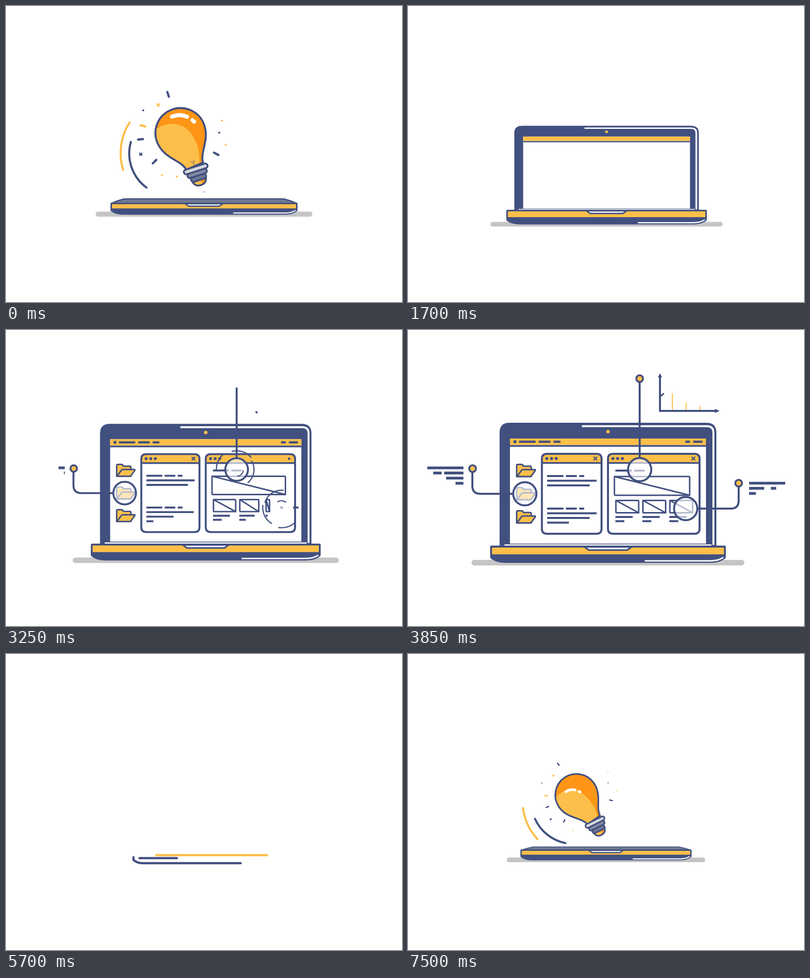
Animation of 800x600 px, one loop 7550 ms. Source, as an HTML page with a canvas:

```html
<!DOCTYPE html>
<html lang="en">
<head>
<meta charset="utf-8">
<title>Idea to laptop</title>
<style>
html, body { margin: 0; width: 100%; height: 100%; overflow: hidden; background: #fff; }
canvas { display: block; width: 800px; height: 600px; }
</style>
</head>
<body>
<canvas id="stage" width="800" height="600"></canvas>
<script>
const c = document.getElementById('stage').getContext('2d');
const LOOP = 7550;
const NAVY = '#425080', YELLOW = '#fdbf4a', ORANGE = '#fe9516', SHADOW = '#c5c5c5', WHITE = '#fff';
const TAU = Math.PI * 2, RAD = Math.PI / 180;

const clamp = v => Math.max(0, Math.min(1, v));
const mix = (a, b, p) => a + (b - a) * p;
const prog = (t, start, dur) => clamp((t - start) / dur);
const out = p => 1 - (1 - p) * (1 - p);
const ease = (t, start, dur) => out(prog(t, start, dur));

function group(draw) { c.save(); draw(); c.restore(); }

function paint(fill, stroke, w = 4, path = null) {
  if (fill) { c.fillStyle = fill; path ? c.fill(path) : c.fill(); }
  if (stroke) { c.strokeStyle = stroke; c.lineWidth = w; path ? c.stroke(path) : c.stroke(); }
}

function shape(d, fill, stroke, w) { paint(fill, stroke, w, new Path2D(d)); }

function rect(x, y, w, h, r, fill, stroke, lw) {
  c.beginPath();
  c.roundRect(x, y, w, h, r);
  paint(fill, stroke, lw);
}

function arc(x, y, r, from, to, color, w) {
  c.beginPath();
  c.arc(x, y, r, from * RAD, to * RAD);
  paint(null, color, w);
}

function disc(x, y, r, fill, stroke, lw) {
  if (r <= 0) return;
  c.beginPath();
  c.arc(x, y, r, 0, TAU);
  paint(fill, stroke, lw);
}

function line(x1, y1, x2, y2, color = NAVY, w = 4, cap = 'round') {
  c.beginPath();
  c.moveTo(x1, y1);
  c.lineTo(x2, y2);
  c.lineCap = cap;
  paint(null, color, w);
}

function trim(d, len, p, w = 4) {
  if (p <= 0) return;
  group(() => {
    c.lineCap = 'butt';
    if (p < 1) c.setLineDash([len * p, len * 2]);
    shape(d, null, NAVY, w);
  });
}

// Word bars laid out from x in direction dir, each growing a little after the last.
function words(x, y, widths, p, { dir = 1, gap = 5, w = 4, cap = 'butt' } = {}) {
  widths.forEach((width, i) => {
    const q = clamp(p * 1.3 - i * .15);
    if (q > 0) line(x, y, x + dir * width * q, y, NAVY, w, cap);
    x += dir * (width + gap);
  });
}

/* ---- bulb ---- */
const BULB = 'M-20 79C-22 55 -55 38 -55 0A55 55 0 0 1 55 0C55 38 22 55 20 79Z';
const FILAMENT = 'M-5 79L-11.5 8Q-13 -6 -20 -6A8 8 0 1 0 -20 10H20A8 8 0 1 0 20 -6Q13 -6 11.5 8L5 79';
const TIP = 'M-16 108Q-14 123 0 123Q14 123 16 108Z';

function glass(t) {
  const peek = prog(t, -50, 50), settle = ease(t, 0, 300);
  const light = .4 * peek + .6 * settle, wire = .03 + .11 * peek + .86 * settle;
  const m = (a, b) => mix(a, b, light);
  shape(BULB, ORANGE);
  group(() => {
    c.clip(new Path2D(BULB));
    const y = m(-24, -36);
    shape(`M${m(-54, -37)} ${y}C${m(-16, 5)} ${m(-36, -38)} ${m(24, 28)} ${m(-18, -10)} ` +
      `${m(20, 28)} ${m(45, 20)}Q24 50 11 80H-60V${y}Z`, YELLOW);
  });
  group(() => {
    c.translate(0, 79 * (1 - wire));
    c.scale(wire, wire);
    shape(FILAMENT, null, NAVY, Math.min(4, 2 / wire));
  });
  shape(BULB, null, NAVY, 4.2);
  group(() => {
    const size = mix(.75, 1, peek);
    c.translate(-16 * (1 - peek), 8 * (1 - peek));
    c.rotate(-14 * RAD * (1 - settle));
    c.scale(size, size);
    shape('M7 -40Q24 -36 33 -20', null, WHITE, 9);
    shape('M38 -7L39 -2', null, WHITE, 8.5);
  });
}

function bulb(t) {
  const away = prog(t, 1270, 180);
  const grow = ease(t, -187, 261), s = grow * (1 - away * away);
  if (s < .1) return;
  // Damped swing while the bulb comes to rest.
  const rot = -18 * Math.exp(-t / 250) * Math.cos(t / 150 + .7) / Math.cos(.7);
  group(() => {
    c.beginPath();
    c.rect(0, 0, 800, 390);
    c.clip();
    c.translate(400 + rot * .33, 362 + 25 * (1 - grow) + 36 * away);
    c.rotate(rot * RAD);
    c.scale(s, s);
    c.translate(0, -124);
    c.lineCap = c.lineJoin = 'round';
    group(() => {
      c.translate(0, 82);
      c.rotate(rot * .3 * RAD);
      c.translate(0, -82);
      glass(t);
    });
    shape(TIP, YELLOW);
    shape('M1 108H16Q14 123 2 123Q6 115 1 108Z', ORANGE);
    shape(TIP, null, NAVY, 4);
    ['#6e7994', '#808ba3', '#d6dadc'].forEach((color, i) =>
      rect(-17 - 5 * i, 101 - 10.3 * i, 34 + 10 * i, 10.3, 5, color, NAVY));
  });
}

function bulbShadow(t) {
  const rx = 36 * ease(t, -15, 300) * (1 - prog(t, 1200, 220));
  if (rx <= 0) return;
  c.beginPath();
  c.ellipse(400, 377, rx, .6 + rx * .103, 0, 0, TAU);
  paint(SHADOW);
}

/* ---- burst around the rising bulb ---- */
// d dot, l dash, s star; capitals are yellow. Nine on the left, the rest on the right.
const BITS = 'DDlslLdSlDdDl';

function star(x, y, r, color) {
  const k = r * .3;
  shape(`M${x - r} ${y - r}Q${x} ${y - k} ${x + r} ${y - r}Q${x + k} ${y} ${x + r} ${y + r}` +
    `Q${x} ${y + k} ${x - r} ${y + r}Q${x - k} ${y} ${x - r} ${y - r}`, color);
}

function burst(t) {
  const far = t < 0 ? 1 + t / 50 : 1 + 1.2 * ease(t, 0, 250);
  const size = clamp(.55 + .45 * far) * (1 - prog(t, 150, 300));
  if (size < .03) return;
  [...BITS].forEach((kind, i) => {
    const angle = ((i < 9 ? 96 + 19.5 * i : -20 + 16 * (i - 9)) + 17 * (far - 1)) * RAD;
    const r = 70 + 14 * far + 8 * Math.sin(i * 2.4);
    const ux = Math.cos(angle), uy = Math.sin(angle);
    const x = 345 + 9 * far + ux * r, y = 284 - 22 * far + uy * r;
    const color = kind < 'a' ? YELLOW : NAVY, half = 5 * size;
    if (/s/i.test(kind)) star(x, y, 4 * size, color);
    else if (/l/i.test(kind)) line(x - ux * half, y - uy * half, x + ux * half, y + uy * half, color, 4.5 * size);
    else disc(x, y, 2 * size, color);
  });
}

function swoosh(t) {
  const orbit = (x, y, r, tail, head, color) => {
    const from = Math.max(100, tail + .5 * t), to = head + .8 * Math.min(t, 60);
    c.lineCap = 'round';
    if (to > from) arc(x, y, r, from, to, color, 4.2);
  };
  orbit(346, 298, 114.5, 162, 212, YELLOW);
  orbit(335, 299, 86, 126, 195, NAVY);
}

/* ---- laptop body ---- */
function view(z) {
  c.translate(385, 275);
  c.scale(z, z);
  c.translate(-385, -275);
}

function pose(t, z) {
  const s = t < 5420
    ? 1 - .066 * (1 - ease(t, 0, 150))
    : mix(mix(1, .69, prog(t, 5420, 140)), .854, ease(t, 5560, 1690)) + .08 * prog(t, 7500, 50);
  const drop = 15 * prog(t, 5420, 140) * (1 - prog(t, 5700, 1400));
  const k = ease(t, 1350, 200) * (1 - prog(t, 5420, 80));
  const rest = 402.5 - 34.2 * (1 - s);
  return {
    k,
    x: mix(400, 385 + 19 * z, k),
    y: mix(rest + drop, 275 + 164 * z, k),
    s: mix(s, 1.178 * z, k),
    lid: (rest - 391) / (11.5 * s)
  };
}

function place(p) {
  c.translate(p.x, p.y);
  c.scale(p.s, p.s);
}

function body(p, t, lid) {
  const bh = mix(12.2, 15, p.k), end = bh + mix(11.6, 12.6, p.k);
  const reveal = t > 5560 ? 210 * ease(t, 6000, 320) : 210;
  place(p);
  const bar = t < 7000 ? 1 - prog(t, 5350, 150) : ease(t, 7260, 180);
  if (bar > 0) rect(-234 * bar, mix(17.5, 23, p.k), 468 * bar, mix(11, 9.4, p.k), 5, SHADOW);
  if (reveal <= 0) return;
  c.beginPath();
  c.rect(-reveal, -30, reveal * 2, 70);
  c.clip();
  c.lineJoin = c.lineCap = 'round';
  if (lid > 0) group(() => {
    c.scale(1, lid * p.lid);
    shape('M-200.5 0Q-188 -7 -172 -11.5H172Q188 -7 200.5 0Z', '#6e7993', NAVY, 3);
  });
  shape(`M-202 ${bh - 1}V${end - 8}Q-194 ${end} -177 ${end + .5}H177Q194 ${end} 202 ${end - 8}V${bh - 1}Z`, NAVY);
  rect(-200.5, 0, 401, bh, 1, YELLOW, NAVY, 3.2);
  shape('M-40.5 .5L-33 6H33L40.5 .5Z', '#f4f5f9', NAVY, 2.8);
  shape(`M64 ${end - 3}H176Q190 ${end - 3.5} 197 ${end - 8.5}`, null, WHITE, 2.4);
}

// Outline strokes that build the closed body.
function sketch(p, t) {
  if (t < 5560 || t > 6330) return;
  const grow = ease(t, 5540, 300), mid = 100 * (1 - grow);
  group(() => {
    place(p);
    c.lineCap = 'round';
    const w = 4.5 / p.s;
    line(mid - 199 * grow, 0, mid + 199 * grow, 0, YELLOW, w);
    line(-182, 8.5, mix(-182, 199, prog(t, 5640, 220)), 8.5, NAVY, w);
    shape(`M-199 6V13Q-192 21 -177 22.5H${mix(-177, 180, grow)}`, null, NAVY, w);
  });
}

/* ---- screen ---- */
function folder(y, p) {
  if (p <= 0) return;
  group(() => {
    c.translate(0, y);
    c.lineJoin = 'round';
    group(() => {
      c.scale(1, clamp(p * 2));
      shape('M219.5 0V-22Q219.5 -24.5 222 -24.5H230Q232 -24.5 233 -21H247Q249 -21 249 -18V0Z', YELLOW, NAVY, 3);
    });
    c.scale(1, Math.max(.15, p * 2 - 1));
    shape('M220 0L229 -12Q230 -14 232 -14H256Q258 -14 257 -12L249 -1Q248 0 246 0Z', YELLOW, NAVY, 3);
  });
}

function pane(x, w, u, start, crossAt) {
  const dur = 360, r = x + w;
  const d = `M${x} 269V261Q${x} 251 ${x + 10} 251H${r - 10}Q${r} 251 ${r} 261V403Q${r} 413 ${r - 10} 413` +
    `H${x + 10}Q${x} 413 ${x} 403Z`;
  const head = ease(u, start + dur, 170);
  if (head > 0) group(() => {
    c.clip(new Path2D(d));
    c.fillStyle = YELLOW;
    c.fillRect(x, 251, w * head, 17);
    line(x, 269.5, x + w * head, 269.5, NAVY, 3.6, 'butt');
    for (let i = 0; i < 3; i++) disc(x + 10 + i * 9.5, 260.5, 3.1 * head, NAVY);
  });
  trim(d, w * 2 + 316, prog(u, start, dur));
  const k = 3 * prog(u, crossAt, 150), cx = r - 12.5;
  if (k > 0) for (const side of [-k, k]) line(cx - side, 260.5 - k, cx + side, 260.5 + k, NAVY, 2.4);
}

// A heading of three words over lines that get shorter.
function paragraph(y, rows, u, start) {
  for (let j = 0; j < rows; j++) {
    const widths = j ? [100 - 14 * (j - 1) ** 2] : [33, 22, 10];
    words(281, y + 9.5 * j, widths, prog(u, start + 70 * j, 280));
  }
}

function frame(x, y, w, h, p) {
  if (p <= 0) return;
  rect(x, y, w * p, h, 2, WHITE, NAVY, 3);
  line(x, y, x + w * p, y + h, NAVY, 3);
}

function screen(u) {
  rect(206, 220, 396, 213, 0, WHITE);
  rect(206, 220, 396, 13, 0, YELLOW);
  line(206, 235, 602, 235, NAVY, 3.6, 'butt');
  const menu = { gap: 10, w: 4.6, cap: 'round' };
  disc(216, 226.5, 3.2 * prog(u, 2300, 130), NAVY);
  words(226, 226.5, [30, 20, 10], prog(u, 2300, 260), menu);
  words(562, 226.5, [6, 15], prog(u, 2500, 260), menu);
  for (let i = 0; i < 3; i++) folder(297 + 47 * i, prog(u, 2050 + i * 140, 250));
  pane(270.5, 120.5, u, 2270, 2800);
  pane(404, 185, u, 2330, 3190);
  paragraph(296, 3, u, 2750);
  paragraph(362, 4, u, 2970);
  words(419, 285, [33, 21], prog(u, 2900, 280));
  frame(417, 297, 152, 38, ease(u, 2850, 260));
  for (let i = 0; i < 3; i++) {
    const x = 420 + 54.5 * i, at = 2950 + i * 140;
    frame(x, 345.5, 46, 25, ease(u, at, 260));
    words(x - 1, 379, [35], prog(u, at, 230));
    words(x - 1, 387.5, [18], prog(u, at + 30, 230));
  }
}

function lid(h, u) {
  c.translate(0, 439);
  c.scale(1, h);
  c.translate(0, -439);
  shape('M185 440V208Q185 188 205 188H603Q623 188 623 208V440Z', NAVY);
  c.lineCap = 'round';
  shape('M353 195H604Q617 195 617 208V434', null, WHITE, 4);
  line(196, 436, 612, 436, WHITE, 3);
  disc(404, 206, 3.6, YELLOW);
  screen(u);
}

/* ---- callouts ---- */
function lens(x, y, u, start, rings) {
  const p = (u - start) / 420, r = 23.5;
  if (p <= 0) return;
  const q = clamp((p - .4) / .5);
  if (q >= 1) disc(x, y, r, 'rgba(255,255,255,.62)');
  trim(`M${x} ${y - r}A${r} ${r} 0 0 0 ${x} ${y + r}A${r} ${r} 0 0 0 ${x} ${y - r}`, TAU * r, q);
  const grow = Math.min(clamp(p / .25), clamp((1.3 - p) / .3));
  if (!rings || grow <= 0) return;
  const spin = (p - .95) * 200;
  c.lineCap = 'round';
  for (let i = 0; i < 3; i++) {
    const from = 180 + 75 * i + spin;
    arc(x, y, 42 - 3 * i, from, from + (50 + 14 * i) * grow, NAVY, 2.5);
  }
  arc(x, y, 14, 10 + spin, 10 + spin + 70 * grow, NAVY, 2.4);
  if (p < .5) disc(x, y, 2, WHITE, NAVY, 1);
}

function callout(d, len, x, y, u, start, dur) {
  trim(d, len, prog(u, start, dur));
  disc(x, y, 6.8 * ease(u, start + dur, 100), YELLOW, NAVY, 3.8);
}

function caption(x, y, dir, u, start, step) {
  for (let j = 0; j < 4; j++) {
    const widths = j === 1 ? [39, 17] : [73 - 19 * j];
    words(x, y + 10.4 * j, widths, prog(u, start + step * j, 300), { dir, w: 5.6 });
  }
}

function chart(u) {
  const p = ease(u, 3250, 420);
  if (p <= 0) return;
  [45, 30, 37, 50].forEach((h, i) => {
    const q = prog(u, 3600 + 90 * i, 340);
    if (q > 0) rect(533 + 28 * i, 162 - h * q, 2 + 9 * clamp(q * 4 - 3), h * q, 0, YELLOW);
  });
  trim('M511 134L538 108L570 124L596 112L621 100', 125, prog(u, 3830, 320), 3.2);
  line(509, 164, 509, 164 - 72 * p);
  line(509, 164, 509 + 116 * p, 164);
  const tip = prog(u, 3620, 100);
  if (tip > 0) {
    shape(`M${509 - 2.5 * tip} 95L509 ${95 - 5 * tip}L${509 + 2.5 * tip} 95Z`, NAVY, NAVY, 2);
    shape(`M621 ${164 - 2.5 * tip}L${621 + 6 * tip} 164L621 ${164 + 2.5 * tip}Z`, NAVY, NAVY, 2);
  }
}

function callouts(u) {
  lens(236, 332, u, 2160, false);
  lens(468, 283, u, 2850, true);
  lens(561, 362, u, 3130, true);
  callout('M212 332H146Q130 332 130 316V288', 120, 130.5, 281, u, 2550, 300);
  callout('M468 259V105', 154, 468, 98.5, u, 2880, 390);
  callout('M585 362H652Q668 362 668 346V317', 121, 668, 310.5, u, 3220, 330);
  caption(112, 279.5, -1, u, 3210, 30);
  caption(689, 310.5, 1, u, 3580, 90);
  chart(u);
}

function draw(t) {
  c.clearRect(0, 0, 800, 600);
  const bt = t > 7000 ? t - LOOP : t;
  // The outro plays the screen content backwards, faster.
  const u = t < 4800 ? t : 4300 - (t - 4800) * 4.2;
  const z = .851 + .149 * ease(t, 2380, 1470) * (1 - ease(t, 5000, 400));
  const open = ease(t, 1450, 450) * (1 - ease(t, 5200, 250));
  const p = pose(t, z);
  const upright = open > .08;
  const flat = upright ? 0 : t > 5560 ? ease(t, 6500, 250) : 1;

  if (upright) group(() => { view(z); lid(open, u); });
  group(() => body(p, t, flat));
  sketch(p, t);
  if (upright) group(() => { view(z); callouts(u); });
  if (bt < 1500) {
    bulbShadow(bt);
    swoosh(bt);
    bulb(bt);
    burst(bt);
  }
}

const begin = performance.now();
function tick() {
  draw((performance.now() - begin) % LOOP);
  requestAnimationFrame(tick);
}
tick();
</script>
</body>
</html>
```
